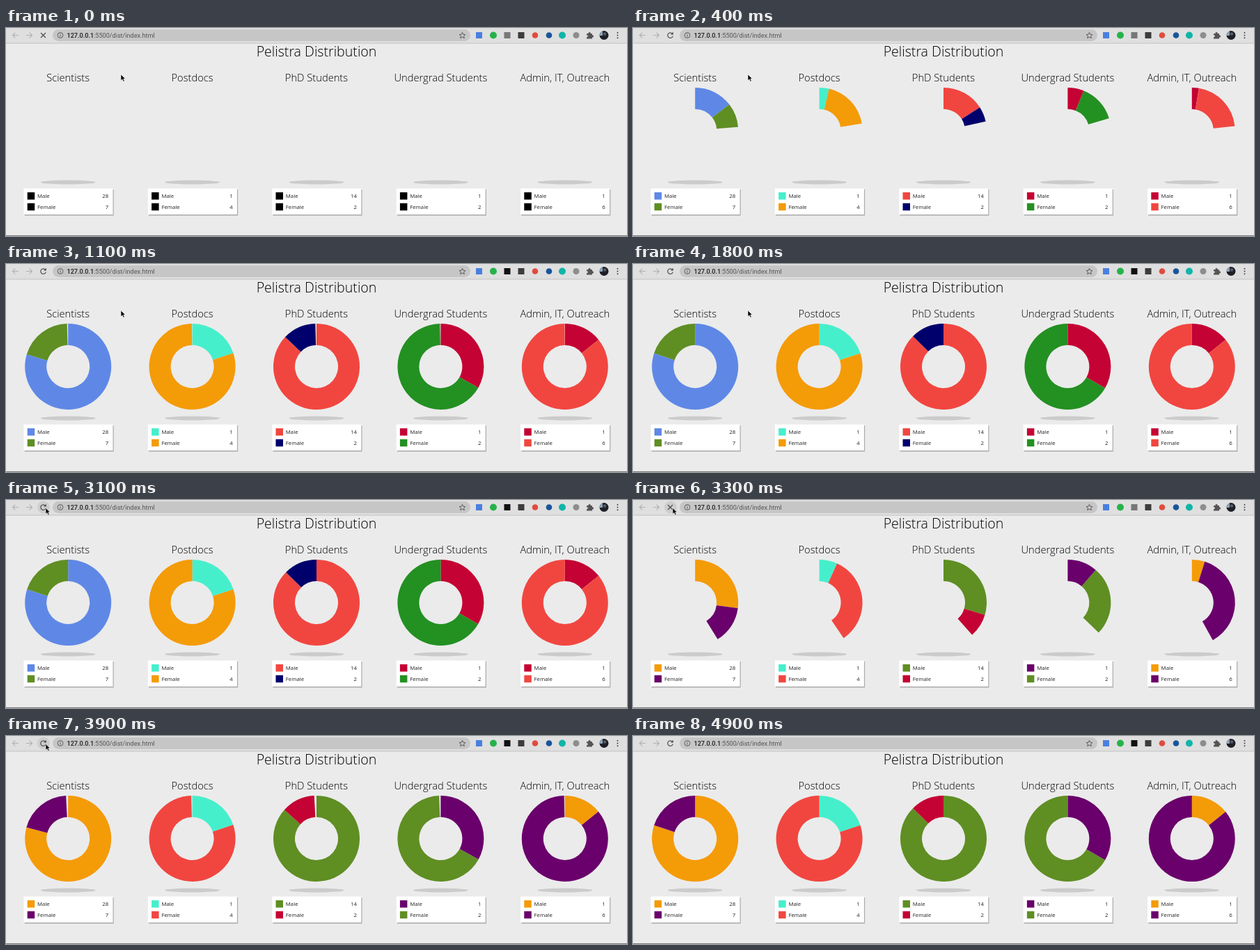
Write an HTML page that moves like this. It is 892 by 300 pixels and loops after 5000 ms.

```html
<!DOCTYPE html>
<html lang="en">
<head>
<meta charset="utf-8">
<title>Distribution charts</title>
<style>
  html, body { margin: 0; width: 100%; height: 100%; overflow: hidden; background: #ebebeb; }
  svg { display: block; }
  .page { font-family: "Open Sans", sans-serif; fill: #000; }
  .title { font-size: 19.6px; font-weight: 300; text-anchor: middle; }
  .label { font-size: 14.7px; font-weight: 300; text-anchor: middle; }
  .key { font-size: 7.8px; fill: #222; }
  .end { text-anchor: end; }
  .url { font: 9.1px Roboto, sans-serif; fill: #555; }
  .host { font-weight: 500; fill: #1c1c1c; }
</style>
</head>
<body>
<svg width="892" height="300" viewBox="0 0 892 300">
  <defs>
    <filter id="soft" x="-10%" y="-60%" width="120%" height="220%"><feGaussianBlur stdDeviation="0.7"/></filter>
    <clipPath id="face"><circle cx="859" cy="10.5" r="6.5"/></clipPath>
  </defs>
  <rect width="892" height="300" fill="#ebebeb"/>

  <g id="page" class="page">
    <text class="title" x="446" y="41">Pelistra Distribution</text>
  </g>

  <g id="toolbar">
    <rect width="892" height="22" fill="#dfdfdf"/>
    <rect y="21.5" width="892" height="1" fill="#c2c2c2"/>
    <g fill="none" stroke="#b0b0b0" stroke-width="1.1">
      <path d="M18 10.5H9.5M13.3 6.7 9.5 10.5l3.8 3.8"/>
      <path d="M29 10.5h8.500M33.700 6.700l3.800 3.800-3.800 3.800"/>
    </g>
    <circle id="hover" cx="54" cy="10.500" r="9" fill="#cdcdcd"/>
    <g fill="none" stroke="#4c4c4c" stroke-width="1.2">
      <path id="stop" d="M50 7l7 7M57 7l-7 7"/>
      <g id="reload">
        <path d="M56.600 8.200A3.800 3.800 0 1 0 57.300 11.600"/>
        <path d="M57.800 5.800v3.800h-3.800z" fill="#4c4c4c" stroke="none"/>
      </g>
    </g>
    <rect x="67" y="2" width="600" height="17" rx="8.5" fill="#c6c6c6"/>
    <g fill="none" stroke="#505050" stroke-width="0.9">
      <circle cx="78" cy="10.500" r="3.900"/>
      <path d="M78 10v2.600M78 8.200v1"/>
      <path d="M655.500 6.300l1.300 2.900 3.100.3-2.300 2.100.7 3.100-2.800-1.700-2.800 1.700.7-3.100-2.300-2.100 3.100-.3z"/>
    </g>
    <text class="url" x="87.500" y="13.700"><tspan class="host">127.0.0.1</tspan>:5500/dist/index.html</text>

    <rect x="675" y="6" width="9" height="9" fill="#4a7fe0"/>
    <circle cx="700" cy="10.500" r="5" fill="#25b34b"/>
    <rect id="toggle" x="715.500" y="6" width="9" height="9"/>
    <rect x="735.500" y="6" width="9" height="9" fill="#3c3c3c"/>
    <circle cx="760" cy="10.500" r="4.300" fill="#e14a3c"/>
    <circle cx="780" cy="10.500" r="4.300" fill="#16559c"/>
    <circle cx="799" cy="10.500" r="5" fill="#10b5a8"/>
    <circle cx="819" cy="10.500" r="4.500" fill="#8d8d8d"/>
    <path d="M834 8h2.700a1.500 1.500 0 1 1 2.800 0h2.500v2.500a1.500 1.500 0 1 1 0 2.800v2.200h-8v-2.400a1.400 1.400 0 1 0 0-2.700z" fill="#555"/>
    <g clip-path="url(#face)">
      <rect x="852" y="4" width="14" height="14" fill="#1d2026"/>
      <rect x="852" y="4" width="5" height="7" fill="#8fa3b8"/>
      <circle cx="860" cy="8.500" r="2.300" fill="#555b66"/>
    </g>
    <g fill="#444"><circle cx="878.500" cy="6.800" r="1"/><circle cx="878.500" cy="10.500" r="1"/><circle cx="878.500" cy="14.200" r="1"/></g>
  </g>

  <rect y="299" width="892" height="1" fill="#777"/>
  <path id="cursor" d="M0 0v8.800l2.100-1.900 1.500 3.300 1.600-.7-1.500-3.200h2.700z" fill="#000" stroke="#fff" stroke-width="0.6"/>
</svg>
<script>
const LOOP = 5000, STEP = 100, GROW = 1020;
const FIRST = 350, BLANK = 3200, SECOND = 3200;
const CY = 148, OUTER = 62, INNER = 31;

const color = {
  blue: "#5f88e6", olive: "#5f8e23", turq: "#46efcc", orange: "#f49b08", red: "#f14640",
  navy: "#00006c", crimson: "#c40233", green: "#239022", purple: "#6a006b"
};

// rate: how steeply the second slice eases out
const charts = [
  { name: "Scientists", values: [28, 7], rate: 12, looks: ["blue olive", "orange purple"] },
  { name: "Postdocs", values: [1, 4], rate: 5.3, looks: ["turq orange", "turq red"] },
  { name: "PhD Students", values: [14, 2], rate: 12, looks: ["red navy", "olive crimson"] },
  { name: "Undergrad Students", values: [1, 2], rate: 4.8, looks: ["crimson green", "purple olive"] },
  { name: "Admin, IT, Outreach", values: [1, 6], rate: 5.5, looks: ["crimson red", "orange purple"] }
];

const $ = id => document.getElementById(id);
const page = $("page");

function add(tag, attrs, text) {
  const el = document.createElementNS("http://www.w3.org/2000/svg", tag);
  for (const k in attrs) el.setAttribute(k, attrs[k]);
  if (text !== undefined) el.textContent = text;
  return page.appendChild(el);
}

function show(el, on) {
  el.setAttribute("visibility", on ? "visible" : "hidden");
}

charts.forEach((c, i) => {
  const x = c.x = 89.2 + 178.4 * i;
  add("text", { class: "label", x, y: 77 }, c.name);
  add("ellipse", { cx: x, cy: 222.5, rx: 39.5, ry: 3, fill: "#cbcbcb", filter: "url(#soft)" });
  add("rect", { x: x - 62.5, y: 233, width: 128, height: 37.5, fill: "#aaa", filter: "url(#soft)" });
  add("rect", { x: x - 63.7, y: 231.5, width: 128, height: 37.5, fill: "#fff" });
  c.swatches = [];
  c.slices = [];
  ["Male", "Female"].forEach((word, n) => {
    const y = 237 + 15.7 * n;
    c.swatches.push(add("rect", { x: x - 58.5, y, width: 10.5, height: 10.5 }));
    add("text", { class: "key", x: x - 44.2, y: y + 8 }, word);
    add("text", { class: "key end", x: x + 58, y: y + 8 }, c.values[n]);
    c.slices.push(add("path", {}));
  });
});

// Ring slice between two fractions of a turn, clockwise from the top
function ring(cx, from, to) {
  if (to - from < 1e-4) return "";
  const at = (r, f) => {
    const a = f * 2 * Math.PI;
    return (cx + r * Math.sin(a)).toFixed(2) + " " + (CY - r * Math.cos(a)).toFixed(2);
  };
  const big = to - from > 0.5 ? 1 : 0;
  return `M${at(OUTER, from)}A${OUTER} ${OUTER} 0 ${big} 1 ${at(OUTER, to)}` +
    `L${at(INNER, to)}A${INNER} ${INNER} 0 ${big} 0 ${at(INNER, from)}Z`;
}

const clamp = u => Math.max(0, Math.min(1, u));
const easeOut = (u, n) => 1 - Math.pow(1 - u, n);

function drawCharts(t) {
  const run = t < BLANK ? 0 : 1;
  const u = clamp((t - (run ? SECOND : FIRST)) / GROW);
  show(page, t !== BLANK);
  for (const c of charts) {
    const fills = c.looks[run].split(" ").map(n => u > 0 ? color[n] : "#000");
    const share = c.values[0] / (c.values[0] + c.values[1]);
    const mid = share * easeOut(u, 4);
    const end = u > 0 ? mid + (1 - share) * easeOut(u, c.rate) : 0;
    c.slices[0].setAttribute("d", ring(c.x, 0, mid));
    c.slices[1].setAttribute("d", ring(c.x, mid, end));
    fills.forEach((f, n) => {
      c.slices[n].setAttribute("fill", f);
      c.swatches[n].setAttribute("fill", f);
    });
  }
}

function drawToolbar(t) {
  const loading = t < 400 || (t >= BLANK && t < 3400);
  show($("stop"), loading);
  show($("reload"), !loading);
  show($("hover"), t >= 2500 && t < 4400);
  $("toggle").setAttribute("fill", t < 500 || (t >= BLANK && t < 3600) ? "#777" : "#111");
}

function drawCursor(t) {
  const u = clamp((t - 1850) / 650), s = u * u * (3 - 2 * u);
  const away = clamp((t - 4300) / 200);
  const x = 165 - 108 * s, y = 67 - 55.5 * s - 28 * away;
  $("cursor").setAttribute("transform", `translate(${x} ${y})`);
  show($("cursor"), away < 1);
}

const began = performance.now();
function frame() {
  const t = Math.floor((performance.now() - began) % LOOP / STEP) * STEP;
  drawCharts(t);
  drawToolbar(t);
  drawCursor(t);
  requestAnimationFrame(frame);
}
frame();
</script>
</body>
</html>
```
